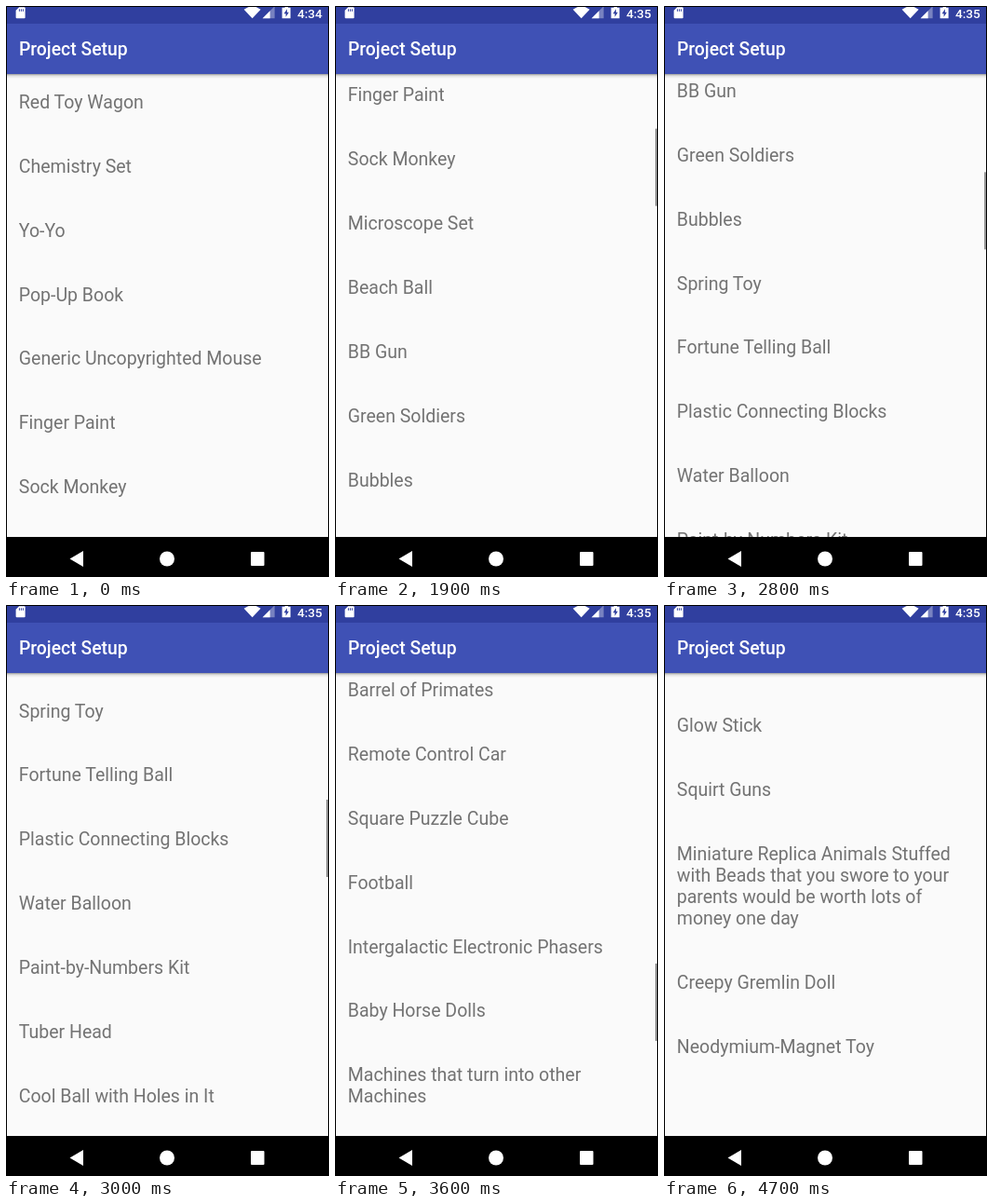
Recreate the animation shown at these times as an HTML page. Size 347 px wide and 613 px high, loop 5000 ms.

```html
<!DOCTYPE html>
<html lang="en">
<head>
<meta charset="utf-8">
<title>Project Setup</title>
<style>
  @property --scroll { syntax: "<number>"; inherits: true; initial-value: 0; }
  @property --glow { syntax: "<number>"; inherits: true; initial-value: 0; }

  html, body {
    margin: 0;
    width: 100%;
    height: 100%;
    overflow: hidden;
    background: #fafafa;
    font-family: Roboto, "Open Sans", sans-serif;
  }
  body {
    position: relative;
    animation: scroll 5s step-end infinite, glow 5s step-end infinite;
  }
  ul {
    position: absolute;
    top: 73px;
    left: 13.8px;
    width: 317px;
    margin: 0;
    padding: 0;
    list-style: none;
    font-size: 19.5px;
    line-height: 23px;
    color: #737373;
    transform: translateY(calc(var(--scroll) * -1px));
  }
  li { padding: 18.9px 0 27px; }
  svg { position: absolute; inset: 0; }
  text { fill: #fff; font-weight: 500; }

  .thumb {
    transform: translateY(calc(var(--scroll) * 1px / 6));
    animation: thumb 5s step-end infinite;
  }
  .glow {
    transform-origin: 0 570px;
    transform: scaleY(var(--glow));
    animation: fade 5s step-end infinite;
  }
  .before { animation: before 5s step-end infinite; }
  .after { animation: after 5s step-end infinite; }

  @keyframes scroll {
    0% { --scroll: 0; }
    24% { --scroll: 165; }
    32% { --scroll: 190; }
    34% { --scroll: 245; }
    36% { --scroll: 304; }
    38% { --scroll: 352; }
    40% { --scroll: 386; }
    42% { --scroll: 408; }
    44% { --scroll: 418; }
    46% { --scroll: 421; }
    54% { --scroll: 505; }
    56% { --scroll: 632; }
    58% { --scroll: 735; }
    60% { --scroll: 816; }
    62% { --scroll: 872; }
    64% { --scroll: 908; }
    66% { --scroll: 1080; }
    68% { --scroll: 1340; }
    70% { --scroll: 1612; }
    72% { --scroll: 1871.6; }
    74% { --scroll: 2122; }
    76% { --scroll: 2357; }
    78% { --scroll: 2484; }
    80% { --scroll: 2483; }
    82% { --scroll: 2481; }
    84% { --scroll: 2479; }
    86%, 100% { --scroll: 2477; }
  }
  @keyframes glow {
    0% { --glow: 0; }
    78% { --glow: .36; }
    80% { --glow: .54; }
    82% { --glow: .46; }
    84% { --glow: .34; }
    86% { --glow: .22; }
    90% { --glow: .12; }
    92% { --glow: .05; }
    94%, 100% { --glow: 0; }
  }
  @keyframes fade {
    0% { opacity: .3; }
    82% { opacity: .26; }
    84% { opacity: .2; }
    86% { opacity: .13; }
    90% { opacity: .07; }
    92%, 100% { opacity: .03; }
  }
  @keyframes thumb {
    0% { opacity: 0; }
    24% { opacity: .4; }
    90% { opacity: .26; }
    92% { opacity: .13; }
    94%, 100% { opacity: 0; }
  }
  @keyframes before { 0% { opacity: 1; } 36%, 100% { opacity: 0; } }
  @keyframes after { 0% { opacity: 0; } 36%, 100% { opacity: 1; } }
</style>
</head>
<body>
<ul>
  <li>Red Toy Wagon</li>
  <li>Chemistry Set</li>
  <li>Yo-Yo</li>
  <li>Pop-Up Book</li>
  <li>Generic Uncopyrighted Mouse</li>
  <li>Finger Paint</li>
  <li>Sock Monkey</li>
  <li>Microscope Set</li>
  <li>Beach Ball</li>
  <li>BB Gun</li>
  <li>Green Soldiers</li>
  <li>Bubbles</li>
  <li>Spring Toy</li>
  <li>Fortune Telling Ball</li>
  <li>Plastic Connecting Blocks</li>
  <li>Water Balloon</li>
  <li>Paint-by-Numbers Kit</li>
  <li>Tuber Head</li>
  <li>Cool Ball with Holes in It</li>
  <li>Toy Truck</li>
  <li>Flying Disc</li>
  <li>Two-Handed Pogo Stick</li>
  <li>Toy Hoop</li>
  <li>Dysmorphic Body Image Doll</li>
  <li>Toy Train</li>
  <li>Glass Marbles</li>
  <li>Jump Rope</li>
  <li>Barrel of Primates</li>
  <li>Remote Control Car</li>
  <li>Square Puzzle Cube</li>
  <li>Football</li>
  <li>Intergalactic Electronic Phasers</li>
  <li>Baby Horse Dolls</li>
  <li>Machines that turn into other Machines</li>
  <li>Teddy Bears</li>
  <li>Shaved Ice Maker</li>
  <li>Glow Stick</li>
  <li>Squirt Guns</li>
  <li>Miniature Replica Animals Stuffed with Beads that you swore to your parents would be worth lots of money one day</li>
  <li>Creepy Gremlin Doll</li>
  <li>Neodymium-Magnet Toy</li>
</ul>
<svg width="347" height="613" viewBox="0 0 347 613">
  <defs>
    <linearGradient id="shade" x2="0" y2="1">
      <stop stop-opacity=".38"/>
      <stop offset=".4" stop-opacity=".1"/>
      <stop offset="1" stop-opacity="0"/>
    </linearGradient>
  </defs>

  <circle class="glow" cx="173.5" cy="1018" r="517" fill="#3f51b5"/>
  <rect class="thumb" x="344" y="73" width="2" height="83"/>

  <!-- app bar and status bar -->
  <rect y="73" width="347" height="5" fill="url(#shade)"/>
  <rect y="19" width="347" height="54" fill="#3f51b5"/>
  <rect width="347" height="19" fill="#303f9f"/>
  <text x="14" y="53.2" font-size="19.35">Project Setup</text>

  <g transform="translate(-.4 -.7)">
    <g fill="#fff">
      <path d="M14.5 2H20a1 1 0 0 1 1 1V13a1 1 0 0 1-1 1H12a1 1 0 0 1-1-1V5.5z"/>
      <path d="M256 4.5Q265-2.5 274 4.5L265 14z"/>
      <path d="M289 1V14H276z" opacity=".35"/>
      <path d="M284 6V14H276z"/>
      <path d="M300 1h3.5v1.500H306V14H297V2.500h3z"/>
    </g>
    <path d="M14.8 4v2.500M16.8 4v2.500M18.8 4v2.500" stroke="#303f9f"/>
    <path d="M302.3 4L299 9h2v3.500L304.3 7.500h-2z" fill="#303f9f"/>
  </g>
  <g font-size="13.6">
    <text class="before" x="313" y="12.5">4:34</text>
    <text class="after" x="313" y="12.5">4:35</text>
  </g>

  <!-- navigation bar -->
  <rect y="570" width="347" height="43"/>
  <g fill="#fff">
    <path d="M68.5 593.5L83 585V602z"/>
    <circle cx="173" cy="593.5" r="8"/>
    <rect x="263" y="586" width="14.5" height="15" rx="1"/>
  </g>
  <path d="M.5 613V.5H346.500V613" fill="none" stroke="#000"/>
</svg>
</body>
</html>
```
